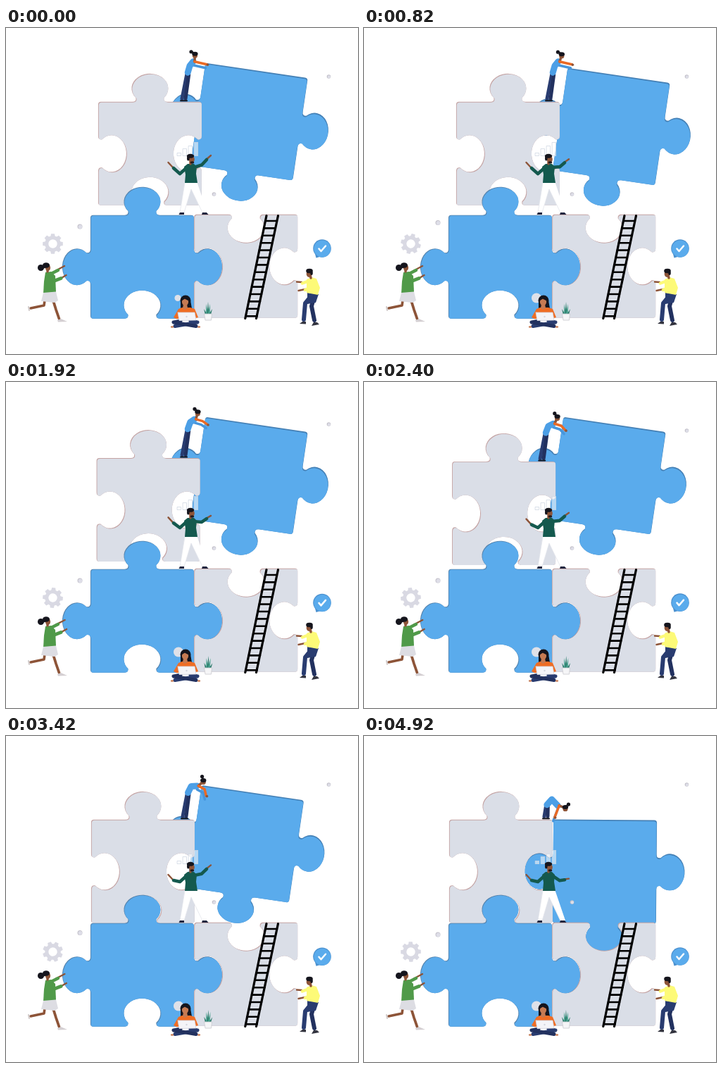
Write an HTML page with a canvas that moves like this. It is 500x463 px and loops after 4.94 s.

```html
<!DOCTYPE html>
<html lang="en">
<head>
<meta charset="utf-8">
<title>Puzzle teamwork</title>
<style>
  html, body { margin: 0; width: 100%; height: 100%; overflow: hidden; background: #fff; }
  canvas { display: block; width: 500px; height: 463px; }
</style>
</head>
<body>
<canvas id="stage" width="500" height="463"></canvas>
<script>
const c = document.getElementById('stage').getContext('2d');
const LOOP = 4940, TAU = Math.PI * 2, DEG = Math.PI / 180;
const BLUE = '#5aabec', GREY = '#dadee7', NAVY = '#293c70', SKIN = '#8d5438', INK = '#15151d';

// Timing: a clamped 0..1 ramp, a single sine hump and a steady sway.
const ramp = (t, from, to) => Math.min(1, Math.max(0, (t - from) / (to - from)));
const hump = (t, from, to) => Math.sin(Math.PI * ramp(t, from, to));
const sway = t => Math.sin(t / LOOP * TAU * 3);

// Point at a distance, with the angle in degrees clockwise from straight up.
const reach = ([x, y], length, deg) =>
  [x + length * Math.sin(deg * DEG), y - length * Math.cos(deg * DEG)];

function trace(p) {
  c.beginPath();
  for (let i = 0; i < p.length; i += 2) c.lineTo(p[i], p[i + 1]);
}
function line(color, width, ...p) {
  trace(p);
  c.strokeStyle = color;
  c.lineWidth = width;
  c.stroke();
}
function poly(color, ...p) {
  trace(p);
  c.fillStyle = color;
  c.fill();
}
function dot(color, x, y, rx, ry = rx) {
  c.beginPath();
  c.ellipse(x, y, rx, ry, 0, 0, TAU);
  c.fillStyle = color;
  c.fill();
}

// Sides run top, right, bottom, left: 1 is a knob, -1 a notch, 0 straight.
function outline(x, y, angle, sides) {
  const h = 73.5, r = 4, lean = Math.acos(20 / 26);
  c.save();
  c.translate(x, y);
  c.rotate(angle);
  c.beginPath();
  for (const s of sides) {
    c.lineTo(-h + r, -h);
    if (s) {
      c.lineTo(-25, -h);
      c.quadraticCurveTo(-19, -h, -20, -h - s * 5.6);
      c.ellipse(0, -h - s * 19, 26, 21, 0, s * (Math.PI - lean), s * lean, s < 0);
      c.quadraticCurveTo(19, -h, 25, -h);
    }
    c.lineTo(h - r, -h);
    c.quadraticCurveTo(h, -h, h, -h + r);
    c.rotate(Math.PI / 2);
  }
  c.closePath();
  c.restore();
}
function piece(x, y, angle, sides, color, shade, dx = .9, dy = .9) {
  c.save();
  outline(x, y, angle, sides);
  c.fillStyle = shade;
  c.fill();
  c.clip();
  outline(x + dx, y + dy, angle, sides);
  c.fillStyle = color;
  c.fill();
  c.restore();
}

// Shared motion of the pieces and the woman who stands on them.
function motion(t) {
  return {
    float: hump(t, 0, 1640),
    slide: ramp(t, 1600, 2980),
    drop: ramp(t, 3200, 3850),
    settle: ramp(t, 3420, 3850)
  };
}

function pieces({ float, slide, drop, settle }) {
  const x = 345.3 + 6 * float - 3.3 * drop - 5 * Math.sin(Math.PI * drop);
  const y = 133 + 7 * float + 59.5 * drop;
  piece(x, y, (8.4 - 7.9 * settle) * DEG, [0, 1, 1, 1], BLUE, '#4580b5', -.6, 1.7);
  piece(204.4 - 10 * slide, 178.3 + 14 * slide, 0, [1, -1, -1, -1], GREY, '#c4a3a3');
  piece(340.7, 338.3, 0, [-1, -1, 0, -1], GREY, '#c4a3a3');
  piece(193.4, 339.2, 0, [1, 1, -1, 1], BLUE, '#5583ad');
}

function ladder() {
  line('#000', 3.2, 370, 266.5, 339.8, 412.5);
  line('#000', 3.2, 386.5, 266.5, 355.5, 412.5);
  for (let i = 0; i < 14; i++) {
    const y = 274 + i * 10.4, x = 370.3 - (y - 265) * .206;
    line('#000', 2.6, x, y, x + 16, y);
  }
}

function gear(t) {
  const color = '#d9d9e3';
  c.save();
  c.translate(66.5, 306.5);
  c.rotate(t / LOOP * TAU);
  c.strokeStyle = color;
  c.lineWidth = 5;
  c.beginPath();
  c.arc(0, 0, 8.7, 0, TAU);
  c.stroke();
  for (let i = 0; i < 8; i++) {
    c.rotate(TAU / 8);
    poly(color, -3.3, -10, -2.5, -14.3, 2.5, -14.3, 3.3, -10);
  }
  c.restore();
}

function bead(x, y, r) {
  dot('#c3c1ca', x, y, r);
  dot('#dedee8', x + .4, y + .4, r - .7);
}

function ornaments(t) {
  gear(t);
  [5, 11, 15, 20].forEach((h, i) => {
    const x = 243 + i * 8;
    c.fillStyle = 'rgba(255,255,255,.55)';
    c.fillRect(x, 182 - h, 6, h);
    c.strokeStyle = 'rgba(195,205,220,.6)';
    c.lineWidth = 1;
    c.strokeRect(x + .5, 182.5 - h, 5, h - 1);
  });
  bead(105, 282 - 5.5 * hump(t, 0, 1640) - 6.5 * hump(t, 3200, 4920), 3.5);
  bead(458.5, 69 - 9 * hump(t, 1640, 2200), 2.8);
  bead(295.5, 236, 2.8);
  const y = 313 + .5 * sway(t);
  poly('#4c91cf', 438, y + 4, 440.5, y + 13.5, 449, y + 11);
  dot('#4c91cf', 449, y, 12.8);
  dot(BLUE, 449.3, y + .5, 12);
  line('#fff', 2.5, 444.5, y + .5, 447.5, y + 4, 454, y - 3.5);
}

function puller({ float, slide, drop }) {
  // Bends from leaning on the edge (0) to crouching over it (1).
  const bend = .25 * slide ** .5 + .75 * drop ** 1.5;
  const foot = [250 + 10 * float + 6 * bend ** 2, 102.3 + 14 * slide];
  const hip = reach(foot, 37 - 21 * bend ** 2, 12);
  const back = reach(hip, 13, 15 + 20 * bend);
  const shoulder = reach(hip, 21 - 3 * bend, 29 + 55 * bend);
  const head = reach(shoulder, 9.5, 3 + 15 * float + 110 * bend);
  const bun = reach(head, 7, -50 + 90 * bend);
  const arm = 103 + 98 * bend;
  const hand = reach(shoulder, 18, arm);
  const elbow = reach(shoulder, 10, arm - 25 * Math.sin(Math.PI * bend));
  const [fx, fy] = foot, [hx, hy] = head;
  const under = ([x, y]) => [x - 2, y + 5];

  line(NAVY, 5, hip[0] - 1, hip[1], fx, fy - 2);
  line('#22315f', 5, hip[0] + 2, hip[1], fx + 5, fy - 2);
  line(INK, 2, fx - 2, fy + 1, fx + 7, fy + 1);
  line('#4796dc', 3.5, ...under(shoulder), ...under(elbow), ...under(hand));
  line('#4c9fe6', 9, ...reach(hip, 3, 10), ...back, ...reach(shoulder, 2, -90));
  line(SKIN, 3.5, ...shoulder, hx, hy);
  dot(SKIN, hx, hy + 1, 3.6);
  dot(INK, hx, hy - 1.5, 4.2, 3);
  line(INK, 2.5, ...bun, hx, hy - 2);
  dot(INK, ...bun, 2.6);
  line('#ea6a25', 3.5, ...shoulder, ...elbow, ...hand);
  dot(SKIN, hand[0] + 1, hand[1] + .5, 1.8);
}

function lifter(t) {
  const green = '#14594e';
  const ry = 186 - 5 * Math.cos(TAU * t / 3160) + 12 * ramp(t, 3160, 4920);
  const ly = 191 + 6 * ramp(t, 1640, 2900);
  const ey = 193.5 + (ry - 181) * .5;
  poly('#fff', 254, 218, 271, 218, 286, 262, 279, 263, 263, 229, 253, 263, 247, 262);
  line('#dfe1e8', .7, 254, 220, 247, 262);
  line('#dfe1e8', .7, 253, 262, 263, 229, 279, 262);
  poly('#22263f', 245.5, 265, 247, 262, 253, 262, 253, 265);
  poly('#22263f', 278, 265, 279, 262, 285, 262, 287.5, 265);
  line(SKIN, 2.4, 237, ly + 7, 230.5, ly);
  line(SKIN, 2.4, 284, ey + (ry - ey) * .5, 291, ry);
  line(green, 4.6, 257, 198, 247, 207, 238, ly + 8);
  line(green, 4.6, 267, 198, 278, ey + 1, 285, ey + 1 + (ry - ey) * .6);
  poly(green, 253, 197, 258, 193, 267, 193, 271, 197, 270, 207, 272, 220, 254, 220, 255, 208);
  line(SKIN, 3.5, 262, 190, 262, 193);
  dot(SKIN, 263.8, 186.5, 4, 5);
  dot(INK, 262, 181.8, 5.2, 3);
  dot(INK, 258.8, 185, 1.8, 3.6);
  dot('#231a1b', 264.5, 191, 2.8, 1.8);
}

function pusher(t) {
  const d = .7 * sway(t), green = '#509a49';
  line(SKIN, 3.6, 55, 387, 54, 394, 35, 398);
  line('#d0c9c9', 2, 32, 396, 33, 401);
  line(SKIN, 3.8, 67, 387, 71, 400, 75.5, 413);
  poly('#d4cfd2', 73, 415, 78, 413, 87, 417, 74, 417.5);
  line(SKIN, 2.4, 70, 345, 83 + d, 338);
  line(green, 4.5, 62, 350, 74, 344);
  poly(green, 56, 347, 64, 346, 70, 352, 71, 375, 53, 377, 54, 360);
  line(SKIN, 2.4, 78, 355.5, 85.5 + d, 351);
  line(green, 5, 63, 353, 69, 359, 78, 355.5);
  poly('#dddde3', 53, 376, 71, 374.5, 74, 387, 69, 390, 50, 388);
  line(SKIN, 3.5, 59, 342, 59, 346);
  dot(SKIN, 59.5, 340.5, 3.6, 4.6);
  dot(INK, 57, 337, 5, 3.8);
  dot(INK, 49.5, 340.5, 4.5);
  line(INK, 4, 51, 340, 55, 339);
}

function helper() {
  const yellow = '#fdfa78';
  line('#22315f', 6, 438, 381, 434, 395, 438, 415);
  line(NAVY, 6, 434, 380, 425, 391, 423, 414);
  poly(NAVY, 428, 376, 444, 378, 440, 390, 428, 392);
  poly('#33343f', 417, 420, 421, 417, 426, 417, 426, 420.5);
  poly('#33343f', 434, 423, 437, 418, 442, 418, 445, 421);
  line(SKIN, 2.3, 420, 361, 413, 360.5);
  line(yellow, 4.5, 431, 359, 421, 362.5);
  poly(yellow, 427, 357, 434, 354, 441, 356, 446, 369, 443, 379, 427, 376);
  line(SKIN, 2.4, 425, 371, 415.5, 373);
  line(yellow, 4.5, 436, 367, 425, 372);
  line(SKIN, 3.5, 432, 350, 433, 355);
  dot(SKIN, 430.5, 349, 3.8, 5);
  dot(INK, 431, 345, 4.8, 3.3);
  dot(INK, 434, 348, 1.8, 3);
}

function plant(t) {
  c.save();
  c.translate(287, 407);
  c.rotate(.05 * sway(t));
  for (let i = -2; i <= 2; i++) {
    const tip = i * 3, height = i % 2 ? 15 : 18 - Math.abs(i) * 5;
    poly(i % 2 ? '#45a08c' : '#2c7b6b', i - 1.8, 1, tip, -height, i + 1.8, 1);
  }
  c.restore();
  const pot = [281.5, 406, 292.5, 406, 291.5, 415, 283, 415, 281.5, 406];
  poly('#f5f5f7', ...pot);
  line('#c9c9cf', .8, ...pot);
}

function typist(t) {
  const tan = '#c57a52', grow = ramp(t, 0, 520);
  dot('#dfe1e8', 244 + grow, 383.5, 4.5 + 2.5 * grow);
  dot(INK, 255, 387, 7.5);
  poly(INK, 248, 387, 262, 387, 264, 398, 248, 399);
  poly('#ef6d24', 245, 399, 250, 397, 262, 397, 268, 399, 273, 411, 266, 413, 242, 413, 238, 411);
  poly(tan, 252, 392, 257, 392, 258, 398, 254, 400, 251, 398);
  dot(tan, 254.5, 389, 4.6, 5.2);
  line(INK, 2, 250, 386, 254, 383.5, 259, 386);
  line(NAVY, 5, 262, 416, 272, 418, 240, 423.5);
  line('#22315f', 5, 248, 416, 238, 418, 270, 423.5);
  dot(tan, 236, 424.5, 2.2, 1.2);
  dot(tan, 274, 424.5, 2.2, 1.2);
  const laptop = [244, 404, 268, 404, 270, 415, 246, 415.5, 244, 404];
  poly('#f4f4f8', ...laptop);
  line('#d2d4dd', .8, ...laptop);
  dot('#d2d4dd', 256.5, 410, 1.2);
}

function draw(t) {
  const m = motion(t);
  c.fillStyle = '#fff';
  c.fillRect(0, 0, 500, 463);
  pieces(m);
  ladder();
  ornaments(t);
  puller(m);
  lifter(t);
  pusher(t);
  helper();
  plant(t);
  typist(t);
}

c.lineJoin = c.lineCap = 'round';
const begin = performance.now();
function tick() {
  draw((performance.now() - begin) % LOOP);
  requestAnimationFrame(tick);
}
tick();
</script>
</body>
</html>
```
